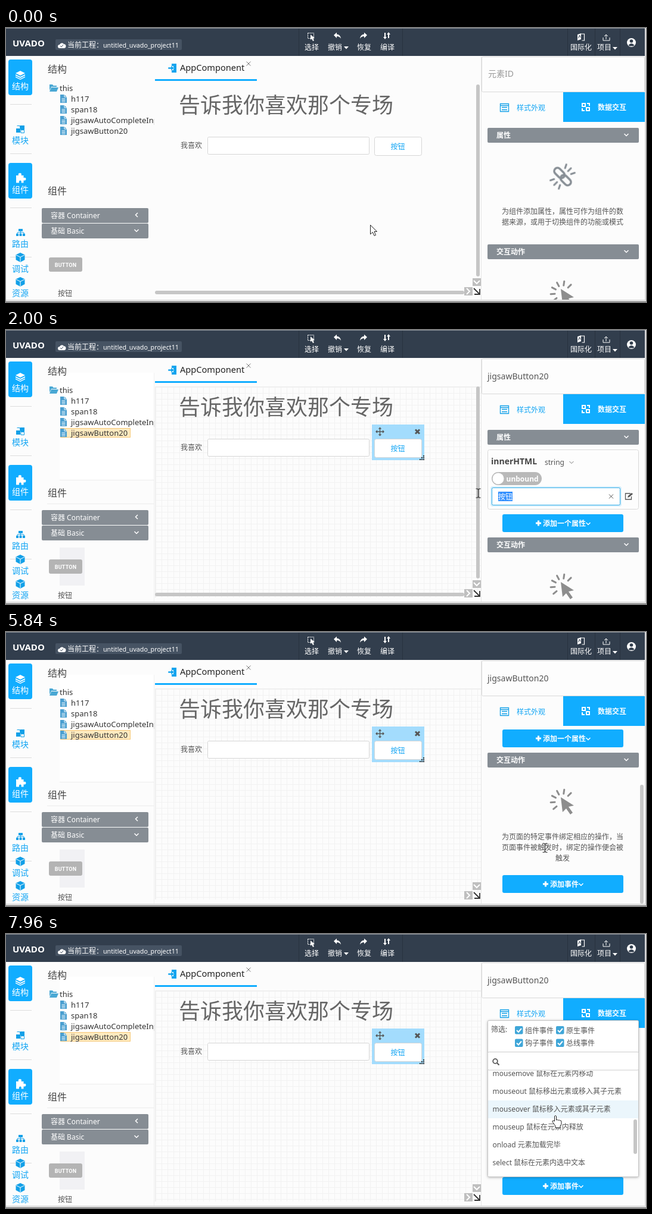
These frames come from a looping animation (1074 px wide and 461 px high, 8000 ms). An HTML page:

```html
<!DOCTYPE html>
<html lang="zh-CN">
<head>
<meta charset="utf-8">
<title>Component editor</title>
<style>
html, body { margin: 0; width: 100%; height: 100%; overflow: hidden; background: #fcfcfc; }
svg { display: block; width: 1074px; height: 461px; }
text { font: 12px "Noto Sans", "Noto Sans CJK SC", "Noto Sans CJK", sans-serif; fill: #555; }
.white text, text.white { fill: #fff; }
.blue text, text.blue { fill: #12a5f4; }
.side text { font-size: 14px; text-anchor: middle; }
.tree text { font-size: 13px; fill: #333; }
.title { font-size: 16px; fill: #444; }
.big { font-size: 14px; }
.semi { font-weight: 600; }
.mid { text-anchor: middle; }
.bar { fill: #868d94; }
.fillblue { fill: #11adff; }
.pressed { fill: #0fa2fb; }
.box { fill: #fff; stroke: #d6d6d6; }
.thumb { fill: #c6c6c6; }
.ln { fill: none; stroke: #fff; stroke-width: 1.5; }
.gray { stroke: #777; }
.rule { stroke: #ddd; fill: none; }
.ime { text-decoration: underline; }
.cursor, .scroll, .rthumb, .list, .hover, .lthumb { animation: 8s linear infinite; }
.cursor { animation-name: cursor; }
.scroll { animation-name: scroll; }
.rthumb { animation-name: rthumb; }
.list { animation-name: list; }
.lthumb { animation-name: lthumb; }
.hover { animation-name: hover; animation-timing-function: step-end; }
@keyframes cursor {
  0%, .75% { transform: translate(611px, 331px); }
  8.75%, 11.125% { transform: translate(657px, 199px); }
  12.5% { transform: translate(645px, 194px); }
  15.375% { transform: translate(588px, 184px); }
  16.6% { transform: translate(598px, 205px); }
  20.625%, 21.375% { transform: translate(856px, 281px); }
  26.5%, 58.625% { transform: translate(766px, 272px); }
  65.75% { transform: translate(869px, 290px); }
  68.625%, 70.125% { transform: translate(885px, 310px); }
  73% { transform: translate(904px, 363px); }
  77.5% { transform: translate(908px, 430px); }
  79.75%, 80.5% { transform: translate(911px, 437px); }
  84% { transform: translate(908px, 331px); }
  90%, 100% { transform: translate(922px, 305px); }
}
@keyframes scroll {
  0%, 66.25% { transform: none; }
  68.625%, 100% { transform: translateY(-146px); }
}
@keyframes rthumb {
  0%, 66.25% { transform: none; }
  68.625%, 100% { transform: translateY(99px); }
}
@keyframes list {
  0%, 90% { transform: none; }
  99.5%, 100% { transform: translateY(-250px); }
}
@keyframes lthumb {
  0%, 90% { transform: none; }
  99.5%, 100% { transform: translateY(82px); }
}
@keyframes hover {
  0% { transform: translateY(150px); }
  82.375% { transform: translateY(120px); }
  83.375% { transform: translateY(90px); }
  86.6% { transform: translateY(60px); }
  89.4% { transform: translateY(60px); animation-timing-function: steps(8); }
  98.52%, 100% { transform: translateY(300px); }
}
</style>
</head>
<body>
<svg viewBox="0 0 1074 461">
<defs>
  <pattern id="grid" x="251" y="96" width="10" height="10" patternUnits="userSpaceOnUse">
    <path d="M0 .5H10M.5 0V10" stroke="#f2f2f2" fill="none"/>
  </pattern>
  <clipPath id="treeClip"><path d="M60 90H249V255H60z"/></clipPath>
  <clipPath id="panelClip"><path d="M798 158H1072V457H798z"/></clipPath>
  <clipPath id="listClip"><path d="M809 230H1061V408H809z"/></clipPath>
  <path id="down" d="M-3.5-2L0 1.5 3.5-2"/>
  <path id="caret" d="M-4-2H4L0 2.5z" fill="#fff"/>
  <path id="cross" d="M-3.5-3.5L3.5 3.5M3.5-3.5L-3.5 3.5"/>
  <path id="plus" d="M-4.5 0H4.5M0-4.5V4.5" stroke="#fff" stroke-width="3"/>
  <g id="file">
    <path d="M0 0H7L11 4V14H0z" fill="#4a9fd0"/>
    <path d="M7 0V4H11M2.5 7H8.5M2.5 9.5H8.5M2.5 12H8.5" fill="none" stroke="#fff"/>
  </g>
  <g id="cube">
    <path d="M0-8L7.5-4.5V4L0 8-7.5 4V-4.5z" fill="#12a0e8"/>
    <path d="M-7-4L0-.5 7-4M0-.5V7.5" fill="none" stroke="#fff"/>
  </g>
  <g id="check">
    <rect width="13.5" height="13.5" rx="2" fill="#3fa6d8"/>
    <path d="M3 7l3 3 5-6" fill="none" stroke="#fff" stroke-width="2"/>
  </g>
  <path id="ray" d="M0-20V-13" stroke="#8d8d8d" stroke-width="3" stroke-linecap="round"/>
  <g id="clicker">
    <use href="#ray" transform="rotate(8)"/>
    <use href="#ray" transform="rotate(45)"/>
    <use href="#ray" transform="rotate(-28)"/>
    <use href="#ray" transform="rotate(-62)"/>
    <use href="#ray" transform="rotate(-95)"/>
    <use href="#ray" transform="rotate(-130)"/>
    <path d="M-3-7L19 7 10 9 17 19 13 22 6 12 0 18z" fill="#8d8d8d"/>
  </g>
</defs>

<rect width="1074" height="461" fill="#fcfcfc"/>

<!-- top bar -->
<rect width="1072" height="47" fill="#323e4d"/>
<path d="M0 .5H1074" stroke="#8b929a"/>
<path d="M491.5 1V47M665.5 1V47M942.5 1V47M988.5 1V47M1030.5 1V47" stroke="#28323f"/>
<text class="white" x="11" y="31" style="font-size:15px;font-weight:700">UVADO</text>
<rect x="83" y="19" width="212" height="18" rx="2" fill="#465363"/>
<path d="M90 34a3 3 0 0 1 0-6 4 4 0 0 1 7-1 3.5 3.5 0 0 1 0 7z" fill="#fff"/>
<path d="M91 30l2 2 3-4" fill="none" stroke="#465363"/>
<g class="white">
  <text x="103" y="33">当前工程：<tspan style="font-size:10.7px">untitled_uvado_project11</tspan></text>
  <text x="501" y="37">选择</text>
  <text x="540" y="37">撤销</text>
  <text x="589" y="37">恢复</text>
  <text x="628" y="37">编译</text>
  <text x="947" y="37">国际化</text>
  <text x="992" y="37">项目</text>
</g>
<use href="#caret" x="571" y="33"/>
<use href="#caret" x="1022" y="34"/>
<rect x="506.5" y="8.5" width="10" height="9" class="ln" style="stroke-width:1;stroke-dasharray:2 1"/>
<path d="M511 11v9l2-2 2 4 2-1-2-4h3z" fill="#fff"/>
<path id="back" d="M550 12l5-4.500v3q6 0 7 7.500-2-4-7-4v3z" fill="#fff"/>
<use href="#back" transform="translate(1156) scale(-1 1)"/>
<path d="M636 8v8M642 9v8" stroke="#fff" stroke-width="2"/>
<path d="M633 15h6l-3 4zM639 11h6l-3-4z" fill="#fff"/>
<path d="M959 11l6-2v10l-6 2z" fill="#fff"/>
<path d="M965 10h5.500v11h-4" class="ln" style="stroke-width:1.2"/>
<path d="M960.5 17l2-5 1.500 4" fill="none" stroke="#323e4d"/>
<path d="M1007 19V11M1004 14l3-3 3 3M1002 16v5h11v-5" class="ln" style="stroke-width:1"/>
<circle cx="1049.5" cy="24.5" r="7.5" fill="#fff"/>
<circle cx="1049.5" cy="22" r="2.8" fill="#323e4d"/>
<path d="M1044.5 29q5-6 10 0l-2 1.500h-6z" fill="#323e4d"/>

<!-- left rail -->
<rect class="fillblue" x="4" y="53" width="40" height="60" rx="4"/>
<rect class="fillblue" x="4" y="227" width="40" height="60" rx="4"/>
<path class="rule" d="M7 128.5H43M7 211.5H43M7 302.5H43M7 385.5H43"/>
<g class="side white">
  <text x="24" y="103">结构</text>
  <text x="24" y="277">组件</text>
</g>
<g class="side blue">
  <text x="24" y="194">模块</text>
  <text x="24" y="368">路由</text>
  <text x="24" y="410">调试</text>
  <text x="24" y="451">资源</text>
</g>
<path d="M24 72l8 4-8 4-8-4zM16 78l8 4 8-4v2l-8 4-8-4zM16 81.500l8 4 8-4v1.500l-8 4-8-4z" fill="#fff"/>
<path d="M17 248h4q-1-4 2.500-4t2 4h4v4q4-1 4 2t-4 2.500v4h-4q1-4-1.500-4t-2 4h-5z" fill="#fff"/>
<path d="M17 169h7v7h-7zM24 164h7v7h-7z" fill="#12a0e8"/>
<path d="M18.5 164.500h5v4M25 171.500h5.500v5H25z" fill="none" stroke="#12a0e8"/>
<path d="M21 338h7v4h-7zM17 346h4v4h-4zM22.5 346h4v4h-4zM28 346h4v4h-4z" fill="#12a0e8"/>
<path d="M24.5 341v5M19 346v-2h11v2" fill="none" stroke="#12a0e8"/>
<use href="#cube" x="24" y="386"/>
<use href="#cube" x="24" y="427"/>

<!-- structure tree -->
<g data-on="890-8000">
  <path d="M90 72H248V253H90z" fill="#fff"/>
  <path d="M90 252.5H248M69 292.5H248" stroke="#ececec"/>
  <path d="M248.5 72V457" stroke="#f0f0f0"/>
  <path d="M90 366H132V430H90z" fill="#f1f1f4"/>
  <rect x="91.5" y="165.5" width="117" height="15" fill="#ffeabf" stroke="#f6c878"/>
</g>
<text class="title" x="70" y="75">结构</text>
<text class="title" x="70" y="280">组件</text>
<g class="tree" clip-path="url(#treeClip)">
  <path d="M73 95h5l1.500 2H85v2H76l-3 6zM76 100h12l-3 7H73z" fill="#4aa8d4"/>
  <text x="90" y="106">this</text>
  <use href="#file" x="91" y="112"/>
  <text x="109" y="124">h117</text>
  <use href="#file" x="91" y="130"/>
  <text x="109" y="142">span18</text>
  <use href="#file" x="91" y="148"/>
  <text x="109" y="160">jigsawAutoCompleteInput19</text>
  <use href="#file" x="91" y="166"/>
  <text x="109" y="178">jigsawButton20</text>
</g>

<!-- component palette -->
<rect class="bar" x="60" y="303" width="179" height="25" rx="2"/>
<rect class="bar" x="60" y="329" width="179" height="25" rx="2"/>
<g class="white semi">
  <text x="75" y="320">容器 Container</text>
  <text x="75" y="346">基础 Basic</text>
</g>
<path class="ln" d="M221 311l-3.500 3.500 3.500 3.500"/>
<use class="ln" href="#down" x="219" y="341"/>
<rect x="72" y="386" width="56" height="24" rx="3" fill="#b4b4b4"/>
<text class="white mid" x="100" y="401.500" style="font:700 9px Roboto,sans-serif;letter-spacing:.2px">BUTTON</text>
<text x="87" y="451">按钮</text>

<!-- canvas -->
<path d="M797.5 48V457" stroke="#e6e6e6"/>
<path d="M278 60h8v15h-8v-4h3v-7h-3z" fill="#13a4ee"/>
<path d="M272 66h5v-3l5 4.500-5 4.500v-3h-5z" fill="#13a4ee" stroke="#fff" stroke-width=".5"/>
<text x="292" y="72" style="font-size:14.6px;fill:#222">AppComponent</text>
<use href="#cross" x="407" y="60" stroke="#777"/>
<rect class="fillblue" x="250" y="86" width="171" height="3"/>
<g data-on="60-8000">
  <rect x="251" y="96" width="546" height="354" fill="url(#grid)"/>
  <path d="M250.5 450V95.5H797" fill="none" stroke="#ececec"/>
</g>
<text x="290" y="142.500" style="font-size:36px;fill:#666">告诉我你喜欢那个专场</text>
<g data-on="1125-1350">
  <path d="M334 159H614V218H334z" fill="#d5effd"/>
  <path d="M336 159V216H612V159" fill="none" stroke="#bfe6fb" stroke-width="4"/>
</g>
<path data-on="580-890" d="M614 159H702V218H614z" fill="#d5effd"/>
<path data-on="890-8000" d="M614 159H702V219H614z" fill="#a3dcfd"/>
<text x="293" y="202">我喜欢</text>
<rect class="box" x="338.5" y="183.5" width="271" height="29" rx="2"/>
<rect class="box" x="618.5" y="183.5" width="79" height="31" rx="3"/>
<text class="blue mid" x="657.5" y="204">按钮</text>
<g data-on="890-8000" stroke="#555" fill="none">
  <path d="M621 171H634M627.5 164.500V177.500M623 169l-2 2 2 2M632 169l2 2-2 2M625.5 166.500l2-2 2 2M625.5 175.500l2 2 2-2" stroke-width="1.3"/>
  <use href="#cross" x="690.5" y="171" stroke-width="3"/>
  <path d="M701 211v8M698 214v5M695 217v2" stroke="#333" stroke-width="2" stroke-dasharray="2 1"/>
</g>
<g class="thumb" data-on="0-1540 1975-4870">
  <rect x="789" y="95" width="6" height="323" rx="3"/>
  <rect x="250" y="442" width="519" height="6" rx="3"/>
</g>
<path d="M783 421h14v13h-14zM769 436h14v14h-14z" fill="#bfbfbf"/>
<path d="M785 425l5 5 5-5M773 438l5 5-5 5" class="ln" style="stroke-width:2"/>
<path d="M785 438l9 9M795 439v9h-9" fill="none" stroke="#333" stroke-width="1.8"/>

<!-- property panel -->
<rect x="798.5" y="48.5" width="273" height="59" rx="2" fill="#fdfdfd" stroke="#d9d9d9"/>
<text class="big" data-on="0-890" x="809" y="82" style="fill:#999">元素ID</text>
<text class="big" data-on="890-8000" x="808" y="82.5">jigsawButton20</text>
<path d="M935 108H1072V158H935z" class="fillblue"/>
<path d="M829.5 127.500h14v13h-14zM829 130.500h15M832 133.500h9M832 137.500h9" fill="none" stroke="#12a0e8" stroke-width="1.3"/>
<text class="blue" x="857" y="138.5">样式外观</text>
<path d="M967 127h5v5h-5zM974 134h5v5h-5z" class="ln" style="stroke-width:2"/>
<path d="M975 127h4v4M971 139h-4v-4" class="ln" style="stroke-width:2"/>
<text class="white semi" x="993" y="138">数据交互</text>

<g clip-path="url(#panelClip)">
<g class="scroll">
  <rect class="bar" x="808" y="168" width="254" height="25" rx="2"/>
  <text class="white semi" x="823" y="185">属性</text>
  <use class="ln" href="#down" x="1041" y="180"/>

  <g data-on="0-890">
    <g transform="translate(934 250) rotate(45)" fill="none" stroke="#868d94" stroke-width="3.5" stroke-linecap="round">
      <rect x="-18" y="-6" width="20" height="11" rx="5.5"/>
      <rect x="-2" y="-5" width="20" height="11" rx="5.5"/>
      <path d="M0-13V-20M7-13l3-6M-7-13l-3-6M0 13v7M7 13l3 6M-7 13l-3 6" stroke-width="3"/>
    </g>
    <text class="mid" x="934" y="313">为组件添加属性，属性可作为组件的数</text>
    <text class="mid" x="934" y="331">据来源，或用于切换组件的功能或模式</text>
    <rect class="bar" x="808" y="364" width="254" height="25" rx="2"/>
    <text class="white semi" x="823" y="381">交互动作</text>
    <use class="ln" href="#down" x="1041" y="376"/>
    <use href="#clicker" x="934" y="446"/>
  </g>

  <g data-on="890-8000">
    <rect x="808.5" y="201.5" width="253" height="100" rx="3" fill="#fdfdfd" stroke="#d9d9d9"/>
    <text x="814" y="226" style="font-size:14px;font-weight:700;fill:#444">innerHTML</text>
    <text x="904" y="227">string</text>
    <use class="ln gray" href="#down" x="949" y="223" style="stroke-width:1"/>
    <rect x="815" y="239" width="84" height="22" rx="11" fill="#b9b9b9"/>
    <circle cx="826" cy="250" r="9.5" fill="#fff"/>
    <text class="white semi" x="839.5" y="254.5">unbound</text>
    <rect class="box" x="815.5" y="265.5" width="215" height="29" rx="2"/>
    <g data-on="1710-8000" fill="none">
      <rect x="814" y="264" width="218" height="32" rx="3" stroke="#d3eefc" stroke-width="2"/>
      <rect x="815.5" y="265.5" width="215" height="29" rx="2" stroke="#35aee8"/>
    </g>
    <text data-on="890-1816" x="826" y="284.5">按钮</text>
    <g data-on="1816-2920">
      <path d="M826 272H850V288H826z" fill="#3390ff"/>
      <text class="white" x="826" y="284.5">按钮</text>
    </g>
    <g id="typing"></g>
    <text data-on="4130-8000" x="826" y="284.5">确定</text>
    <path data-on="4130-8000" d="M850.5 273V288" stroke="#333"/>
    <use href="#cross" x="1015.5" y="280" stroke="#555"/>
    <path d="M1048 275h-8.500v10h10v-5" fill="none" stroke="#555" stroke-width="1.3"/>
    <path d="M1043 282l1-3 6-5 2 2-6 5z" fill="#555"/>
    <rect class="fillblue" x="833" y="310" width="203" height="30" rx="3"/>
    <use href="#plus" x="893.5" y="325"/>
    <text class="white semi" x="901" y="329.5">添加一个属性</text>
    <use class="ln" href="#down" x="977" y="326"/>
    <rect class="bar" x="808" y="349" width="254" height="25" rx="2"/>
    <text class="white semi" x="823" y="366">交互动作</text>
    <use class="ln" href="#down" x="1041" y="361"/>
    <use href="#clicker" x="934" y="431"/>
    <text class="mid" x="934" y="494.5">为页面的特定事件绑定相应的操作，当</text>
    <text class="mid" x="934" y="512.5">页面事件被触发时，绑定的操作便会被</text>
    <text class="mid" x="934" y="530.5">触发</text>
    <rect class="fillblue" x="833" y="555" width="203" height="30" rx="3"/>
    <rect class="pressed" data-on="6130-7200" x="833" y="555" width="203" height="30" rx="3"/>
    <use href="#plus" x="905.5" y="570"/>
    <text class="white semi" x="913" y="574.5">添加事件</text>
    <use class="ln" href="#down" x="965" y="571"/>
  </g>
</g>
<g data-on="1540-1975 4870-6440">
  <rect class="thumb rthumb" x="1064" y="158" width="6" height="200" rx="3"/>
</g>
</g>

<!-- event picker -->
<g data-on="6440-8000">
  <rect x="808.5" y="145.5" width="253" height="263" rx="2" fill="#fff" stroke="#c4c4c4" style="filter:drop-shadow(0 1px 2px #0004)"/>
  <text x="814" y="165">筛选:</text>
  <use href="#check" x="854" y="155"/><text x="871" y="166.5">组件事件</text>
  <use href="#check" x="923" y="155"/><text x="940" y="166.5">原生事件</text>
  <use href="#check" x="854" y="176.5"/><text x="871" y="188">钩子事件</text>
  <use href="#check" x="923" y="176.5"/><text x="940" y="188">总线事件</text>
  <rect x="808.5" y="198.5" width="253" height="30.5" rx="2" fill="#fff" stroke="#ccc"/>
  <circle cx="821" cy="214" r="3.8" fill="none" stroke="#555" stroke-width="1.8"/>
  <path d="M824 217l3.500 3.500" stroke="#555" stroke-width="2"/>
  <g clip-path="url(#listClip)">
    <g class="list">
      <g data-on="6517-8000"><rect class="hover" x="809" y="230" width="252" height="30" fill="#ebf6fc"/></g>
      <g id="events"></g>
    </g>
    <rect class="thumb lthumb" x="1053" y="230" width="6" height="58" rx="3"/>
  </g>
</g>

<!-- window edge -->
<path d="M1073 0V461" stroke="#dcdcdc" stroke-width="2"/>
<path d="M0 458.5H1074" stroke="#dedede" stroke-width="3"/>
<path d="M0 460.5H1074" stroke="#777"/>

<g class="cursor">
  <path data-on="0-1125 1350-1580 2120-4961" d="M.5.5V16l3.800-3.500L7 18.500l2.500-1L7 11.500h4.500z" fill="#fff" stroke="#222"/>
  <path data-on="1125-1350 1580-2120 4961-6150" d="M-3.500-7.500H-1L.5-6 2-7.500H4.500M.5-6.500V6.500M-3.500 7.500H-1L.5 6 2 7.500H4.500" fill="none" stroke="#222" stroke-width="1.2"/>
  <path data-on="6150-8000" d="M-1.500 10V1.500q1.500-2 3 0V8q2-1.200 3 .3 2-.9 3 .5 2.300-.4 2.500 1.400v4.800l-2 3v3h-8v-3l-5-7q-.5-2.500 2-2z" fill="#fff" stroke="#222"/>
</g>
</svg>
<script>
const byId = id => document.getElementById(id);

function addText(parent, x, y, label) {
  const el = document.createElementNS('http://www.w3.org/2000/svg', 'text');
  el.setAttribute('x', x);
  el.setAttribute('y', y);
  el.textContent = label;
  return parent.appendChild(el);
}

const eventNames = [
  'click 鼠标在元素内单击', 'contextmenu 鼠标在元素内右击', 'dblclick 鼠标在元素内双击',
  'keydown 键盘的按键按下', 'keyup 键盘的按键抬起', 'mousedown 鼠标在元素内按下',
  'mouseenter 鼠标移入元素', 'mouseleave 鼠标移出元素', 'mousemove 鼠标在元素内移动',
  'mouseout 鼠标移出元素或移入其子元素', 'mouseover 鼠标移入元素或其子元素',
  'mouseup 鼠标在元素内释放', 'onload 元素加载完毕', 'select 鼠标在元素内选中文本'
];
eventNames.forEach((name, i) => addText(byId('events'), 816.5, 249 + 30 * i, name));

// Each keystroke shows one more letter of the pinyin.
const keyTimes = [3010, 3100, 3620, 3890, 3950, 4010, 4070, 4130];
[...'queding'].forEach((_, i) => {
  const el = addText(byId('typing'), 826, 284.5, 'queding'.slice(0, i + 1));
  el.classList.add('ime');
  el.dataset.on = `${keyTimes[i]}-${keyTimes[i + 1]}`;
});

// data-on lists the spans, in ms, during which an element is visible.
const sheet = document.createElement('style');
document.querySelectorAll('[data-on]').forEach((el, i) => {
  const steps = el.dataset.on.split(' ').map(span => {
    const [from, to] = span.split('-').map(ms => ms / 80);
    return `${from}%{visibility:visible}${to}%{visibility:hidden}`;
  });
  sheet.textContent += `@keyframes on${i}{0%{visibility:hidden}${steps.join('')}}\n`;
  el.style.animation = `on${i} 8s step-end infinite`;
});
document.head.append(sheet);
</script>
</body>
</html>
```
